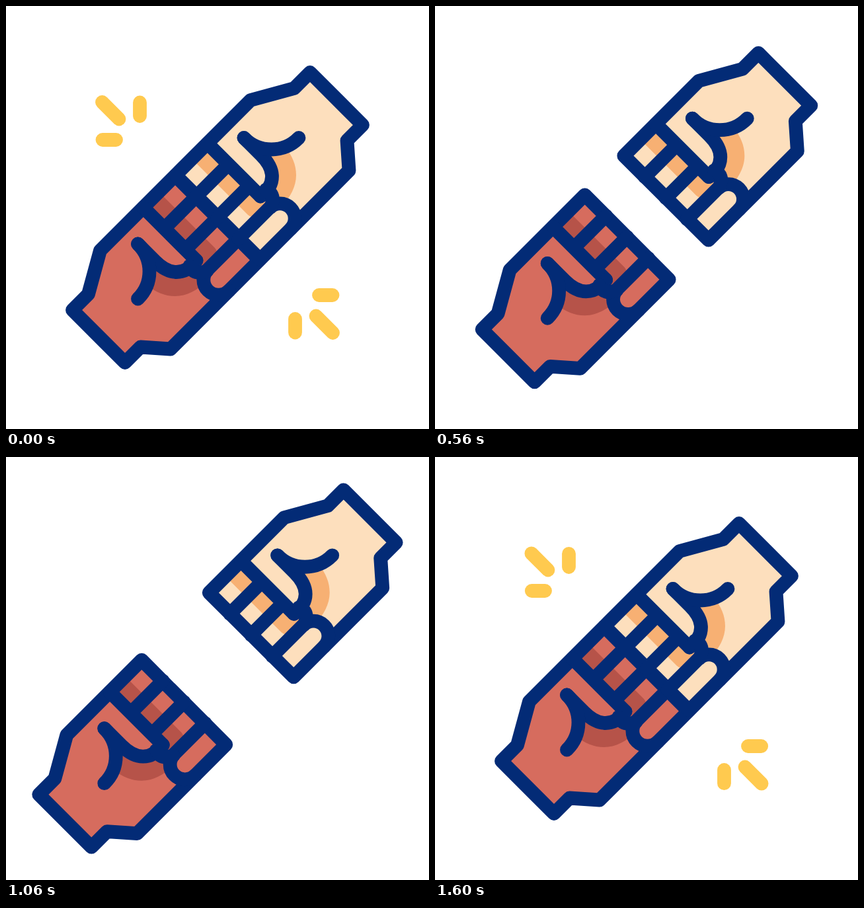
Recreate the animation shown at these times as an HTML page. Size 640 by 640 pixels, loop 1620 ms.

```html
<!DOCTYPE html>
<html lang="en">
<head>
<meta charset="utf-8">
<title>Fist bump</title>
<style>
  html, body { margin: 0; width: 100%; height: 100%; overflow: hidden; background: #fff; }
  svg { display: block; width: 100%; height: 100%; }
  .line { fill: none; stroke: #032b76; stroke-width: 20.8; stroke-linecap: round; stroke-linejoin: round; }
  .spark { fill: none; stroke: #ffca4f; stroke-width: 20.8; stroke-linecap: round; }
  .light { --skin: #fddfbd; --shade: #f7b073; }
  .dark { --skin: #d66c5e; --shade: #b65349; }
  .skin { fill: var(--skin); }
  .shade { fill: var(--shade); }
</style>
</head>
<body>
<svg viewBox="0 0 640 640">
  <defs>
    <g id="fist">
      <path class="skin" d="M286.5 226 400 112.5 466 94.5 490 70.5 569.5 150 546 173.5 549 219 414.5 353.5Z"/>
      <path class="shade" d="M335 178 311.5 201.5 396 286C405 294 430 292 446 274 460 260 469 243 469 226 469 210 463 197 453 184L425 190Q432.5 212 432.5 228 432.5 245 415 257Z"/>
      <g class="line">
        <path d="M286.5 226 400 112.5 466 94.5 490 70.5 569.5 150 546 173.5 549 219 414.5 353.5Z"/>
        <path d="M335 178 415 258M318 258 366.5 209.5M350 290 398.5 241.5"/>
        <path d="M382 322 428.5 275.5A22.6 22.6 0 0 1 460.5 307.5"/>
        <path d="M390 169.5 416 195.5Q432.5 212 432.5 228 432.5 245 415 258"/>
        <path d="M390 169.5A58 58 0 0 0 473 169.5"/>
        <path d="M423 248Q434 253 433.5 264L431 274"/>
      </g>
    </g>
    <g id="burst" class="spark">
      <path id="diag"/><path id="vert"/><path id="flat"/>
    </g>
  </defs>
  <g id="sparks">
    <use href="#burst"/>
    <use href="#burst" transform="rotate(180 320 320)"/>
  </g>
  <g class="dark" transform="matrix(0 1 1 0 0 0)"><use class="hand" href="#fist"/></g>
  <g class="light"><use class="hand" href="#fist"/></g>
</svg>
<script>
const LOOP = 1620, REACH = 52;
const $ = id => document.getElementById(id);
const hands = document.querySelectorAll('.hand');

const span = (t, a, b) => Math.min(1, Math.max(0, (t - a) / (b - a)));
const smooth = u => u * u * (3 - 2 * u);

// Cubic easing with flat ends and handles at x1 and x2.
function ease(u, x1, x2) {
  let lo = 0, hi = 1;
  for (let i = 0; i < 24; i++) {
    const s = (lo + hi) / 2, r = 1 - s;
    const x = 3 * r * r * s * x1 + 3 * r * s * s * x2 + s * s * s;
    if (x < u) lo = s; else hi = s;
  }
  return smooth((lo + hi) / 2);
}

function gap(t) {
  return REACH * (t < 1025
    ? ease(span(t, 200, 1020), 0.325, 0.42)
    : 1 - smooth(span(t, 1030, 1360)));
}

// Each ray runs from its outer end (0) to its inner end (1).
function drawSparks(from, to) {
  const lerp = (a, b, k) => (a + (b - a) * k).toFixed(2);
  const d1 = lerp(145.5, 171, from), d2 = lerp(145.5, 171, to);
  const s1 = lerp(146, 166.5, from), s2 = lerp(146, 166.5, to);
  $('diag').setAttribute('d', `M${d1} ${d1}L${d2} ${d2}`);
  $('vert').setAttribute('d', `M202.5 ${s1}V${s2}`);
  $('flat').setAttribute('d', `M${s1} 202.5H${s2}`);
  $('sparks').style.display = to - from > 0.001 ? '' : 'none';
}

function draw(t) {
  const d = gap(t) - 30;
  hands.forEach(h => h.setAttribute('transform', `translate(${d.toFixed(2)} ${(-d).toFixed(2)})`));
  if (t < 800) drawSparks(0, 1 - smooth(span(t, 0, 400)));
  else drawSparks(1 - smooth(span(t, 1360, 1620)), 1);
}

const start = performance.now();
function tick() {
  draw((performance.now() - start) % LOOP);
  requestAnimationFrame(tick);
}
draw(0);
requestAnimationFrame(tick);
</script>
</body>
</html>
```
